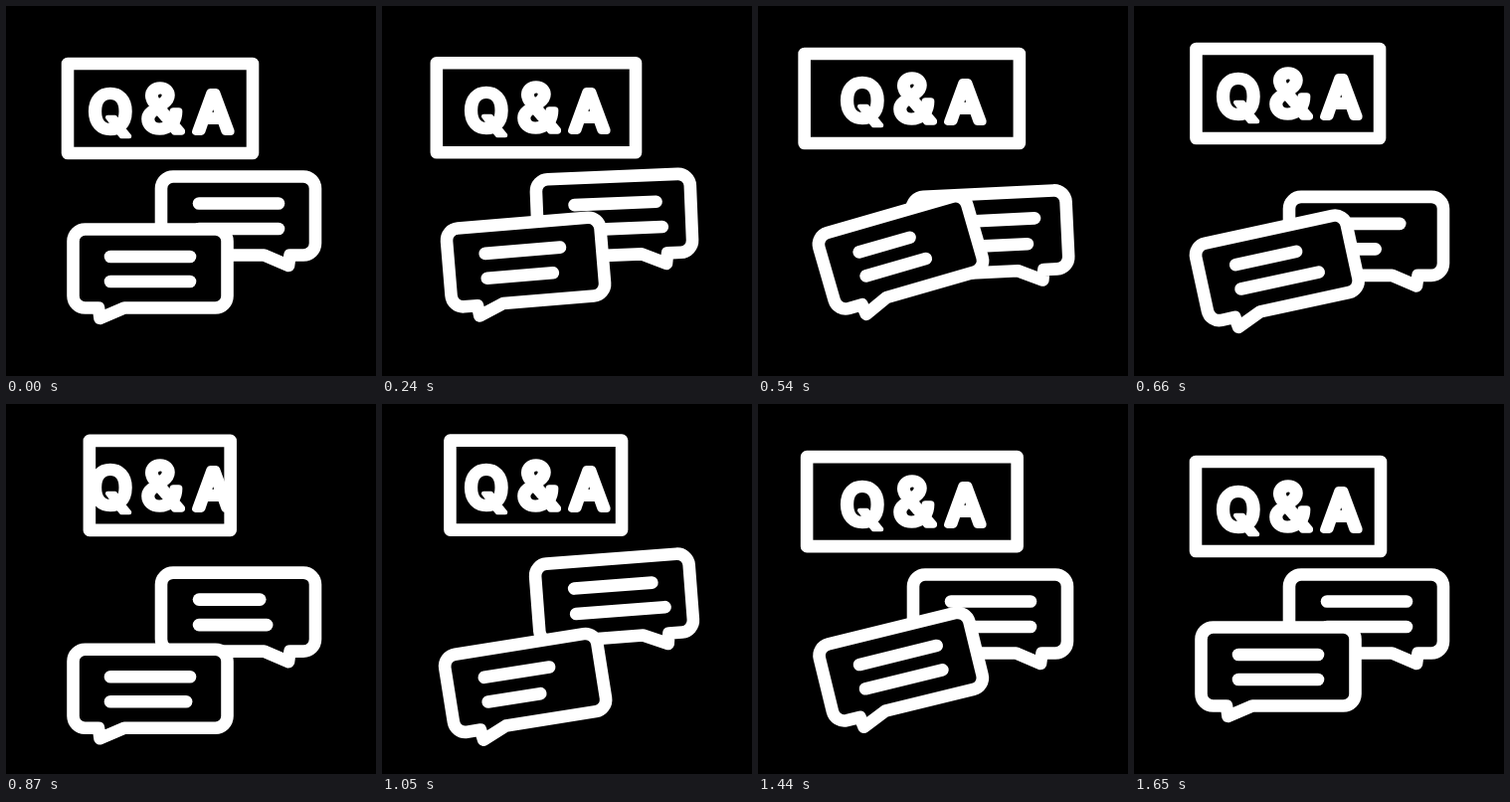
Animation, 372 px wide and 372 px high, one loop 1830 ms. Source, as an HTML page without scripts:

```html
<!DOCTYPE html>
<html lang="en">
<head>
<meta charset="utf-8">
<title>Q&amp;A</title>
<style>
html, body { margin: 0; width: 100%; height: 100%; overflow: hidden; background: #000; }
svg { display: block; width: 100vw; height: 100vh; }
.ink { fill: #000; stroke: #fff; stroke-width: 12.6; stroke-linecap: round; stroke-linejoin: round; }
text {
  font: 400 54px Inter, sans-serif; text-anchor: middle;
  fill: #fff; stroke-width: 8;
}
.round { font-size: 58px; font-weight: 700; stroke-width: 4.5; }
.tall { font-size: 63px; stroke-width: 7.5; }
.line { stroke-dasharray: 80 300; fill: none; }

.sign, .frame, .bubble, .tilt, .line {
  animation: 1830ms cubic-bezier(.37, 0, .63, 1) infinite;
}
.sign { animation-name: lift; }
.frame { x: 62px; width: 186px; animation-name: stretch; }
.front .bubble { animation-name: front-bob; }
.front .tilt { animation-name: front-tilt; transform-origin: 0 5.5px; }
.front .top { animation-name: front-top; }
.front .low { animation-name: front-low; }
.back .bubble { animation-name: back-bob; }
.back .tilt { animation-name: back-tilt; }
.back .top { animation-name: back-top; }
.back .low { animation-name: back-low; }

@keyframes lift {
  0%, 8%, 90.2%, 100% { translate: 0 0; }
  53.6% { translate: 0 -22px; }
}
@keyframes stretch {
  0%, 7.2%, 90.2%, 100% { x: 62px; width: 186px; }
  22.7%, 69.4% { x: 39.75px; width: 230px; }
  49.2% { x: 84.25px; width: 141px; }
}
@keyframes front-bob {
  0%, 7.2%, 71%, 100% { translate: 0 0; }
  23.5% { translate: 0 -22px; }
  49.7% { translate: 0 23px; }
}
@keyframes front-tilt {
  0%, 7.2%, 47.5%, 48.6%, 90.2%, 100% { rotate: 0deg; }
  23.5%, 30.6%, 65%, 74.9% { rotate: -16.1deg; }
}
@keyframes back-bob {
  0%, 14.2%, 76.5%, 100% { translate: 0 0; }
  35.3% { translate: 0 20.5px; }
  56.8% { translate: 0 -16px; }
}
@keyframes back-tilt {
  0%, 7.2%, 35%, 48.6%, 77.6%, 100% { rotate: 0deg; }
  22.4% { rotate: -7deg; }
  65% { rotate: -7.8deg; }
}
@keyframes front-top {
  0%, 7.2%, 46%, 48.6%, 78%, 100% { stroke-dasharray: 80 300; }
  29.5% { stroke-dasharray: 53 300; }
  65.6% { stroke-dasharray: 54 300; }
}
@keyframes front-low {
  0%, 7.2%, 35.5%, 43.7%, 79.8%, 100% { stroke-dasharray: 80 300; }
  22.4% { stroke-dasharray: 39 300; }
  59.6% { stroke-dasharray: 52 300; }
}
@keyframes back-top {
  0%, 7.2%, 78%, 100% { stroke-dasharray: 80 300; }
  24.6%, 65% { stroke-dasharray: 88 300; }
  46.4% { stroke-dasharray: 61 300; }
}
@keyframes back-low {
  0%, 7.2%, 78%, 100% { stroke-dasharray: 80 300; }
  22.4% { stroke-dasharray: 102 300; }
  37.2% { stroke-dasharray: 48 300; }
  58.5% { stroke-dasharray: 90 300; }
}
</style>
</head>
<body>
<svg viewBox="0 0 372 372" class="ink">
  <defs>
    <path id="balloon" d="M-65.5-39.5h131a12 12 0 0 1 12 12v55a12 12 0 0 1-12 12H-26L-50.5 50-52 39.5h-13.5a12 12 0 0 1-12-12v-55a12 12 0 0 1 12-12z"/>
  </defs>

  <g class="sign">
    <rect class="frame" y="58" height="90"/>
    <text><tspan class="round" x="105" y="126.5">Q</tspan><tspan class="tall" x="157" y="126">&amp;</tspan><tspan x="208.5" y="126">A</tspan></text>
  </g>

  <g class="back" transform="translate(233.5 211)">
    <g class="bubble"><g class="tilt">
      <use href="#balloon" transform="scale(-1 1)"/>
      <path class="line top" d="M-39.5-12.5h130"/>
      <path class="line low" d="M-39.5 13h130"/>
    </g></g>
  </g>

  <g class="front" transform="translate(145 264)">
    <g class="bubble"><g class="tilt">
      <use href="#balloon"/>
      <path class="line top" d="M-40-12h130"/>
      <path class="line low" d="M-40 13h130"/>
    </g></g>
  </g>
</svg>
</body>
</html>
```
